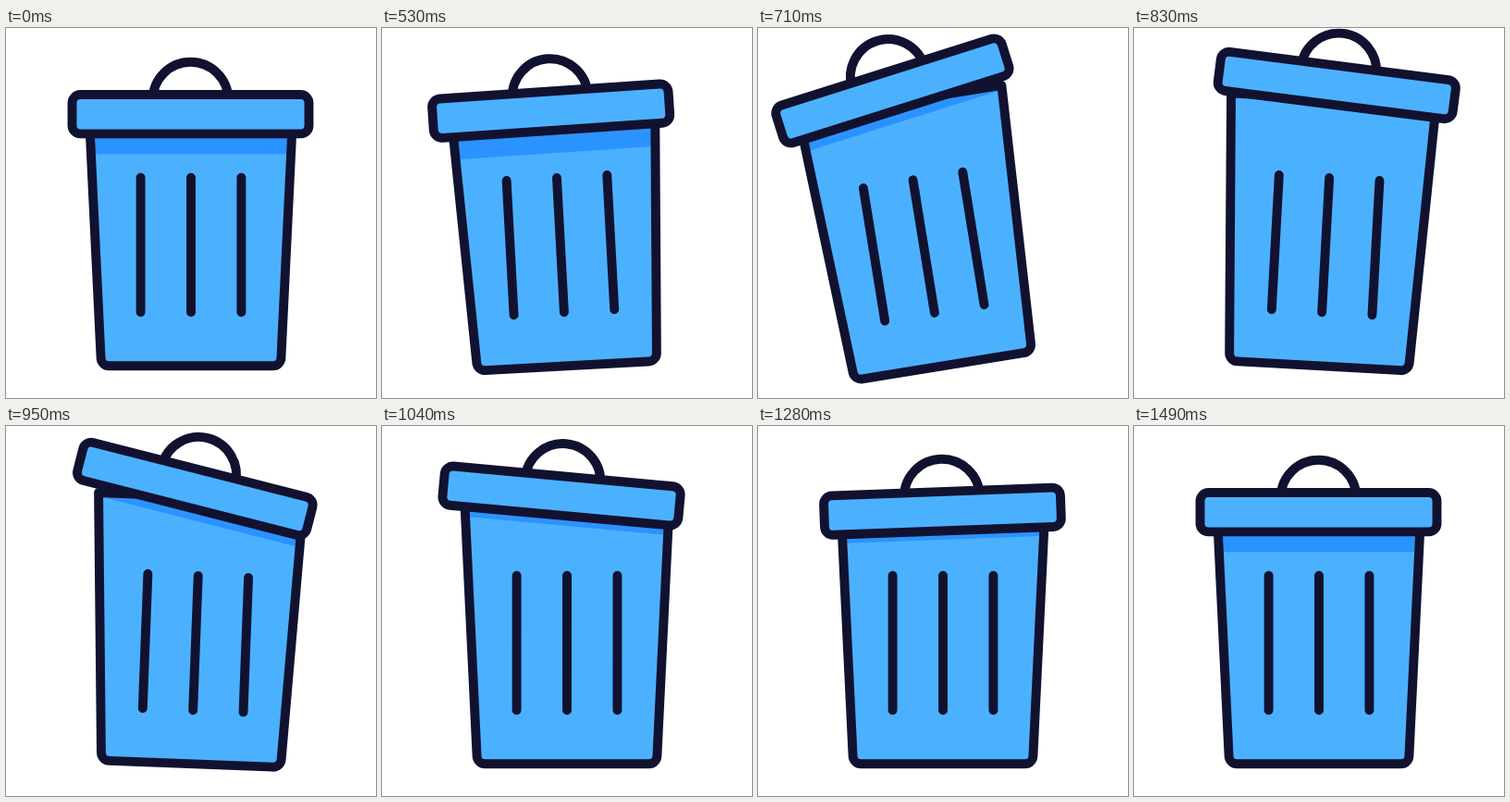
Recreate the animation shown at these times as an HTML page with a canvas. Size 400 px wide and 400 px high, loop 1.58 s.

```html
<!DOCTYPE html>
<html lang="en">
<head>
<meta charset="utf-8">
<title>Trash can</title>
<style>
  html, body { margin: 0; width: 100%; height: 100%; overflow: hidden; background: #fff; }
  canvas { display: block; }
</style>
</head>
<body>
<canvas id="stage" width="400" height="400"></canvas>
<script>
const ctx = document.getElementById('stage').getContext('2d');
const LOOP = 1580, MOVE_START = 530, MOVE_END = 1490, STEP = 30;
const BLUE = '#4bb1fe', SHADE = '#2b93ff', INK = '#111130';
const PIVOT = { x: 200, y: 364 };
const LID = { x: 199.5, y: 93.2 };
const SHADE_DROP = 43;

// Each track is a list of [time in ms, value].
const bodyTilt = [[430, 0], [690, -9.7], [860, 4.2], [1045, 0]];
const lidTilt = [[490, 0], [700, -8.4], [930, 12.4], [1160, -3], [1490, 0]];
const lidLift = [[460, 0], [765, 32.8], [1345, 0]];
const lidShift = [[430, 0], [700, -6], [840, 3.2], [950, -6.5], [1300, 0]];
const shadeLiftUp = [[495, 0], [820, 52]];
const shadeLiftDown = [[820, 52], [950, 34.8], [1130, 23], [1490, 0]];

const sine = p => (1 - Math.cos(Math.PI * p)) / 2;
const linear = p => p;
const radians = deg => deg * Math.PI / 180;

function sample(track, t, ease = sine) {
  if (t <= track[0][0]) return track[0][1];
  for (let i = 1; i < track.length; i++) {
    const [t0, v0] = track[i - 1], [t1, v1] = track[i];
    if (t < t1) return v0 + (v1 - v0) * ease((t - t0) / (t1 - t0));
  }
  return track[track.length - 1][1];
}

function rotateAbout(x, y, deg) {
  ctx.translate(x, y);
  ctx.rotate(radians(deg));
}

function bodyPath() {
  const path = new Path2D();
  path.moveTo(200, 76);
  path.lineTo(311, 76);
  path.arcTo(297, 365.3, 200, 365.3, 9);
  path.arcTo(103, 365.3, 89, 76, 9);
  path.lineTo(89, 76);
  path.closePath();
  return path;
}

function lidPath() {
  const path = new Path2D();
  path.roundRect(-128, -21.2, 256, 42.4, 9);
  return path;
}

const body = bodyPath(), lid = lidPath();

function pose(t) {
  const lift = sample(lidLift, t);
  const shadeLift = t < 820 ? sample(shadeLiftUp, t) : sample(shadeLiftDown, t, linear);
  return {
    body: sample(bodyTilt, t),
    lid: sample(lidTilt, t),
    x: LID.x + sample(lidShift, t),
    y: LID.y - lift,
    shade: SHADE_DROP + lift - shadeLift
  };
}

function draw(t) {
  const p = pose(t);
  ctx.fillStyle = '#fff';
  ctx.fillRect(0, 0, 400, 400);
  ctx.strokeStyle = INK;
  ctx.lineWidth = 9.9;
  ctx.lineCap = ctx.lineJoin = 'round';

  ctx.save();
  rotateAbout(PIVOT.x, PIVOT.y, p.body);
  ctx.translate(-PIVOT.x, -PIVOT.y);

  ctx.fillStyle = BLUE;
  ctx.fill(body);

  ctx.save();
  ctx.clip(body);
  rotateAbout(p.x, p.y, p.lid);
  ctx.fillStyle = SHADE;
  ctx.fillRect(-200, -60, 400, p.shade + 60);
  ctx.restore();

  ctx.beginPath();
  for (const x of [145.6, 200, 254.4]) {
    ctx.moveTo(x, 161.7);
    ctx.lineTo(x, 307.2);
  }
  ctx.stroke();
  ctx.stroke(body);

  rotateAbout(p.x, p.y, p.lid);
  ctx.beginPath();
  ctx.arc(0, -15.7, 40.8, Math.PI, 0);
  ctx.stroke();
  ctx.fillStyle = BLUE;
  ctx.fill(lid);
  ctx.stroke(lid);
  ctx.restore();
}

function frame(now) {
  const t = now % LOOP;
  const moving = t >= MOVE_START && t < MOVE_END;
  draw(moving ? MOVE_START + Math.floor((t - MOVE_START) / STEP) * STEP : 0);
  requestAnimationFrame(frame);
}

draw(0);
requestAnimationFrame(frame);
</script>
</body>
</html>
```
